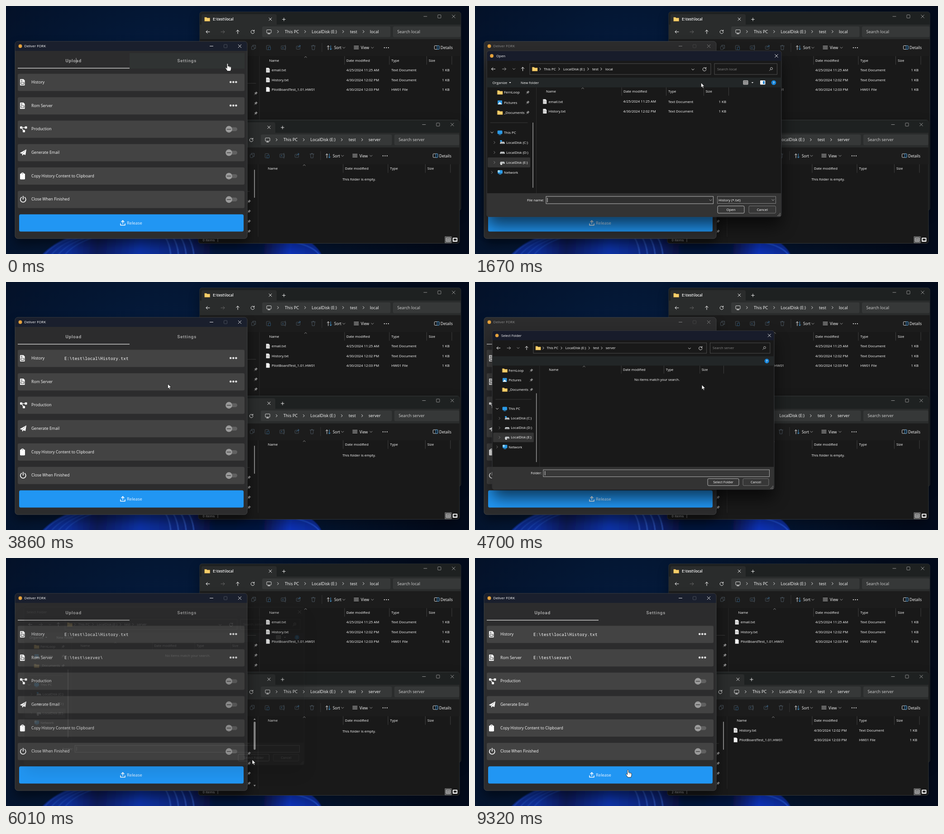
An HTML page for the animation above (9450 ms loop, 1023x547 px).

```html
<!DOCTYPE html>
<html lang="en">
<head>
<meta charset="utf-8">
<title>Release tool demo</title>
<style>
html,body{margin:0;width:100%;height:100%;overflow:hidden;background:#030b1d}
svg{display:block;width:100%;height:100%}
text{font-family:"Open Sans","Noto Sans",sans-serif;white-space:pre}
.mono{font-family:"Noto Sans Mono","DejaVu Sans Mono",monospace}
.tab{font-family:Roboto,sans-serif;font-weight:500;letter-spacing:.86px}
</style>
</head>
<body>
<svg id="stage" viewBox="0 0 1023 547" xmlns="http://www.w3.org/2000/svg"></svg>
<script>
const LOOP = 9450, S = 7.85;
const INK = '#fff', DIM = '#8d8d8d', LINE = '#4a4a4a';
const END = 'text-anchor="end"', MID = 'text-anchor="middle"';

// drawing helpers; text is placed by the middle of its capitals
const T = (x, y, s, size = S, fill = INK, more = '') =>
  `<text x="${x}" y="${y + size * .36}" font-size="${size}" fill="${fill}" ${more}>${s}</text>`;
const R = (x, y, w, h, fill, r = 0, line = 'none', lw = .8) =>
  `<rect x="${x}" y="${y}" width="${w}" height="${h}" rx="${r}" fill="${fill}" stroke="${line}" stroke-width="${lw}"/>`;
const P = (d, line = INK, w = .9, fill = 'none') =>
  `<path d="${d}" stroke="${line}" stroke-width="${w}" fill="${fill}" stroke-linejoin="round" stroke-linecap="round"/>`;
const F = (d, fill) => P(d, 'none', 0, fill);
const C = (x, y, r, fill, line = 'none') => `<circle cx="${x}" cy="${y}" r="${r}" fill="${fill}" stroke="${line}"/>`;
const G = (id, s, more = '') => `<g id="${id}" ${more}>${s}</g>`;
const each = (list, draw) => list.map(draw).join('');
const shade = (x, y, w, h, alpha, drop, blur) =>
  `<rect x="${x}" y="${y + drop}" width="${w}" height="${h}" rx="8" fill="#000" opacity="${alpha}" filter="url(#${blur})"/>`;

// small icons
const right = (x, y, c = INK) => P(`M${x - 1.3} ${y - 2.6}l2.6 2.6-2.6 2.6`, c);
const down = (x, y, c = INK) => P(`M${x - 2.6} ${y - 1.3}l2.6 2.6 2.6-2.6`, c);
const caretUp = (x, y) => P(`M${x - 2.5} ${y + 1.2}l2.5-2.4 2.5 2.4`, '#aaa', .8);
const wedge = (x, y) => F(`M${x - 2.2} ${y - 1}h4.4l-2.2 2.3z`, INK);
const cross = (x, y, c = INK, r = 3.3) => P(`M${x - r} ${y - r}l${2 * r} ${2 * r}m0 ${-2 * r}l${-2 * r} ${2 * r}`, c);
const plus = (x, y) => P(`M${x - 3.3} ${y}h6.6m-3.3-3.3v6.6`);
const arrowL = (x, y) => P(`M${x + 4} ${y}h-8l3.2-3.2m-3.2 3.2l3.2 3.2`, INK, 1);
const arrowR = (x, y, c) => P(`M${x - 4} ${y}h8l-3.2-3.2m3.2 3.2l-3.2 3.2`, c, 1);
const arrowU = (x, y) => P(`M${x} ${y + 4}v-8l-3.2 3.2m3.2-3.2l3.2 3.2`, INK, 1);
const reload = (x, y) => P(`M${x + 3.2} ${y - 2}a3.8 3.8 0 1 0 .6 2.4M${x + 3.6} ${y - 4.2}v2.6h-2.6`);
const folder = (x, y) => P(`M${x} ${y - 4}h4l1.5 1.5h6v7h-11.5z`, '#e0a63c', .5, '#f6cf6b');
const pin = (x, y) => P(`M${x - 3.4} ${y + 3.4}l2.2-2.2`, '#9a9a9a', .8) +
  P(`M${x - 2.8} ${y - .6}l3.4 3.4.8-2.2 2.2-1.4-2.8-2.8-1.4 2.2z`, '#9a9a9a', .5, '#8a8a8a');
const sheet = (x, y, lines) => P(`M${x} ${y - 5}h5.4l2.2 2.2v7.8h-7.6z`, '#bbb', .4, '#f4f4f4') +
  (lines ? P(`M${x + 1.6} ${y - 1.6}h4.6m-4.6 2h4.6m-4.6 2h4.6`, '#8c8c8c', .7) : '');
const screen = (x, y, fill = 'none', line = INK) =>
  R(x - 5, y - 4.5, 10, 7, fill, 1, line) + P(`M${x - 2.5} ${y + 4.5}h5m-2.5-2v2`, line);
const drive = (x, y) => F(`M${x - 4} ${y - 2}h8l1.2 2.4v2h-10.4v-2z`, '#cfd3d6') + P(`M${x - 3.4} ${y + 1.2}h6.8`, '#444', .8);
const winKeys = (x, y, c, box = c) => P(`M${x - 66} ${y}h7`, c) + R(x - 35, y - 3.5, 7, 7, 'none', .8, box) + cross(x, y, c);

const defs = `<defs>
<filter id="soft" x="-20%" y="-20%" width="140%" height="150%"><feGaussianBlur stdDeviation="12"/></filter>
<filter id="deep" x="-20%" y="-30%" width="140%" height="170%"><feGaussianBlur stdDeviation="18"/></filter>
<filter id="haze"><feGaussianBlur stdDeviation="1.2"/></filter>
<radialGradient id="sky" gradientUnits="userSpaceOnUse" cx="350" cy="330" r="640">
<stop offset="0" stop-color="#062250"/><stop offset=".5" stop-color="#041734"/><stop offset="1" stop-color="#030b1c"/></radialGradient>
<linearGradient id="silk" gradientUnits="userSpaceOnUse" x1="80" y1="500" x2="700" y2="560">
<stop offset="0" stop-color="#0a2a88"/><stop offset=".1" stop-color="#0c2f9c"/><stop offset=".2" stop-color="#071a58"/>
<stop offset=".35" stop-color="#0d33a8"/><stop offset=".5" stop-color="#0a2578"/><stop offset=".62" stop-color="#06133c"/>
<stop offset=".78" stop-color="#061442"/><stop offset=".88" stop-color="#0c34bc"/><stop offset="1" stop-color="#0a2a90"/></linearGradient></defs>`;

function wallpaper() {
  let s = F('M78 550Q104 522 150 505H640Q686 522 698 550Z', 'url(#silk)');
  for (let i = 0; i < 4; i++) {
    s += P(`M${86 + i * 15} 548q18-22 58-36`, '#2350c0', 1.2);
    s += P(`M${352 + i * 17} 510q10 16 12 38`, '#3a68d8', 1.3);
  }
  return R(0, 0, 1023, 547, 'url(#sky)') + `<g filter="url(#haze)">${s}${P('M640 522q38 8 52 26', '#2a5fe8', 1.5)}</g>`;
}

const row = (y, name, date, type, lined) => sheet(575, y, lined) + T(587, y, name) + T(752, y, date, 7.75) +
  T(851.5, y, type) + T(980, y, '1 KB', S, INK, END);
const history = y => row(y, 'History.txt', '4/30/2024 12:02 PM', 'Text Document', 1);
const build = y => row(y, 'PilotBoardTest_1.01.HW01', '4/30/2024 12:03 PM', 'HW01 File', 0);

// file manager window; the server one is the same layout shifted
function manager(server) {
  const h = server ? 272 : 438, last = server ? 'server' : 'local', gap = server ? 6 : 0;
  const off = '#4d5862', blue = '#4aa3e0', bar = '#2a2c2c', field = '#363838';
  let s = shade(428, 13, 577, h, .35, 8, 'soft') + R(428, 13, 577, h, '#191919', 5, '#3c3f40');
  s += F('M428.4 41V18q0-4.6 4.6-4.6h567q4.6 0 4.6 4.6v23z', '#1e2121');
  s += F('M432 41.5V22q0-4 4-4h158q4 0 4 4v19.5z', bar);
  s += R(428.4, 41, 576.2, 32.5, bar) + R(428.4, 73.5, 576.2, 37, '#1c1c1c');
  s += folder(439, 29) + T(457, 29, 'E:\\test\\' + last, 8, INK, 'font-weight="600"') + cross(584, 29, INK, 3) + plus(614, 29.5);
  s += winKeys(989, 23, '#a5a5a5');
  s += arrowL(446, 57) + arrowR(479, 57, '#666') + arrowU(512, 57) + reload(545, 57);
  s += R(566, 45, 283.5 + gap, 23.5, field, 3) + R(855 + gap, 45, 149.6 - gap, 23.5, field, 3);
  s += screen(581, 57) + each([601, 661, 745, 790], x => right(x, 56.5));
  s += T(616, 56.5, 'This PC', 9.25) + T(675.5, 56.5, 'LocalDisk (E:)', 9.15) + T(760, 56.5, 'test', 9.15) + T(804, 56.5, last, 9.15);
  s += T(864.5 + gap, 56.5, 'Search ' + last, 9.1, '#d4d4d4');
  // command bar
  s += R(542.5, 89, 6, 7, 'none', 1, off) + P('M545 89v-2.5h6.5v7h-3', off);
  s += R(575.5, 87, 8, 9.5, 'none', 1, off) + R(579.5, 90.5, 5, 6, '#1c1c1c', .5, '#2f5f85');
  s += R(608, 88, 10, 7.5, 'none', 1, off) + T(610, 91.8, 'A', 6, '#3d6f98') + P('M617 86v11.5', off);
  s += R(641.5, 88.5, 8, 7, 'none', 1, off) + P('M645 92q1-4 5.5-4m-2-2l2 2-2 2', '#3d6f98');
  s += P('M674.5 88h9m-7.8 0l.8 8.5h5l.8-8.5m-4.5 0v-1.5h2.4v1.5', off);
  s += P('M698 82v19', '#383838') + P('M712 96.5v-9l-2.4 2.5m2.4-2.5l2.4 2.5') + P('M717.5 87.5v9l-2.3-2.5m2.3 2.5l2.3-2.5', blue);
  s += T(725, 92, 'Sort', 8.4) + down(746.5, 92, '#aaa');
  s += P('M769 88.5h10m-10 3h10m-10 3h10') + T(784, 92, 'View', 8.5) + down(809.5, 92, '#aaa');
  s += each([836, 840.5, 845], x => C(x, 92, 1.1, INK));
  s += R(946.5, 87.5, 10.5, 8, 'none', 1.2, INK) + R(952.5, 87.5, 4.5, 8, '#123', 1, blue) + T(960, 92, 'Details', 8.5);
  // columns and side pane
  s += each([748, 847, 929.5, 985], x => P(`M${x} 111v18`, LINE, .8)) + caretUp(662, 112.5);
  s += T(581.5, 120, 'Name') + T(752, 120, 'Date modified') + T(851.5, 120, 'Type') + T(934, 120, 'Size');
  s += P(`M560 111V${server ? 270 : 450}`, '#2e2e2e') + P(`M440 170.5H${server ? 541 : 552}`, '#3a3a3a');
  for (let i = 0; i < (server ? 4 : 3); i++) s += pin(server ? 540 : 552, 192.5 + i * 22);
  if (!server) return s + row(141.5, 'email.txt', '4/25/2024 11:25 AM', 'Text Document', 1) + history(163) + build(184);
  s += G('thin', R(551.2, 122.5, 1.7, 62, '#9a9a9a', .8));
  s += G('wide', R(550.2, 122.5, 4.3, 62, '#9a9a9a', 2) + F('M549.8 118.5l2.5-3.5 2.5 3.5zM549.8 262l2.5 3.5 2.5-3.5z', '#9a9a9a'));
  s += G('empty', T(746.5, 143.5, 'This folder is empty.'));
  s += G('first', history(141.5)) + G('second', build(162.8));
  s += G('count', T(437.5, 277.4, '0 items', S, '#c8c8c8')) + P('M471 273.5v8', '#999');
  s += R(973, 270.3, 14, 13.5, '#4c4c4c', 0, '#9a9a9a') + R(975.5, 273, 9, 8, 'none', .5, INK) + P('M977 275.5h6m-6 1.8h6m-6 1.8h6', INK, .7);
  return s + R(990.5, 273, 9.5, 8, INK, .5, INK) + R(992, 274.5, 6.5, 4.5, '#222');
}

const rows = ['History', 'Rom Server', 'Production', 'Generate Email', 'Copy History Content to Clipboard', 'Close When Finished'];

function mark(i, y) {
  const K = '#424242';
  if (i < 2) return F(`M31 ${y - 6}q0-1 1-1h6.5l3 3v10q0 1-1 1h-8.5q-1 0-1-1z`, INK) +
    P(`M33 ${y - 4.6}h3m-3 2h3`, K) + R(33, y, 6.8, 4.3, 'none', .5, K, 1.1);
  if (i == 2) return R(31, y - 6, 5, 5, INK, 1) + R(41.5, y - 6, 5, 5, INK, 1) + R(37, y + 2, 5, 5, INK, 1) +
    P(`M35 ${y - 3.5}h7m-7.5 0l4 7`, INK, 1.4);
  if (i == 3) return F(`M30.5 ${y + 1}L45 ${y - 7}L43 ${y + 5.5}L38.7 ${y + 3.8}L36 ${y + 7}L35.6 ${y + 2.7}z`, INK) +
    P(`M36 ${y + 2.6}l6.5-6.6`, K, .7);
  if (i == 4) return R(31, y - 5.5, 11, 13, INK, 1.6) + R(33.8, y - 7.5, 5.4, 4, INK, 1.5) + C(36.5, y - 5, .8, K);
  return P(`M34.3 ${y - 4.7}a6 6 0 1 0 7 0M37.8 ${y - 7}v6.5`, INK, 1.7);
}

function app() {
  const heading = (c, box) => T(40.5, 88.5, 'Deliver FORK', S, c) + winKeys(516.5, 88.5, c, box);
  let s = shade(20, 78, 513, 435, .5, 13, 'soft') + R(20, 78, 513, 435, '#2c2c2d', 6, '#48494b');
  s += G('live', F('M20.5 99V84q0-5.5 5.5-5.5h501q5.5 0 5.5 5.5v15z', '#1a1f2d') + heading(INK, '#555b66'));
  s += G('idle', heading(DIM, LINE)) + C(31.5, 88.5, 3.9, '#e6a23c');
  s += G('hover', R(273, 104, 254, 34, '#303333'));
  s += T(131.5, 120.5, 'Upload', 9.65, '#c2c2c2', 'class="tab"') + T(378.5, 120.5, 'Settings', 9.65, '#b2b2b2', 'class="tab"');
  s += R(26, 136.5, 247, 1.3, '#dcdcdc') + G('beam', P('M155 115v11.5', '#bdbdbd'));
  rows.forEach((name, i) => {
    const y = 168.3 + i * 51.65;
    s += R(26, y - 18.8, 501, 38, '#434343', 3) + mark(i, y) + T(56, y - .3, name, 8.72);
    if (i < 2) s += each([496.2, 502.3, 508.4], x => C(x, y - .5, 2.3, '#e2e2e2'));
    else s += R(488, y - 4, 23, 8.5, '#616161', 4.2) + C(492.5, y + .3, 7.3, '#9b9b9b') + P(`M488.5 ${y + .3}h8`, '#333', 1.3);
  });
  s += G('path1', T(129, 168.5, 'E:\\test\\local\\History.txt', 9.45, INK, 'class="mono"'));
  s += G('path2', T(129, 220, 'E:\\test\\server\\', 9.45, INK, 'class="mono"'));
  s += `<rect id="go" x="29" y="459.5" width="496" height="38" rx="3.5"/>`;
  s += P('M258 480v-6.5m-3 2.8l3-3.2 3 3.2M253 480v3.5h10v-3.5', INK, 1.5);
  return s + T(267, 478.8, 'Release', 9.45, '#eef6ff');
}

// file dialog, for a file or for a folder
function dialog(id, dir) {
  const title = dir ? 'Select Folder' : 'Open', last = dir ? 'server' : 'local', edge = '#5c5c5c';
  const top = fill => F('M26.5 121v-16q0-5.5 5.5-5.5h639q5.5 0 5.5 5.5v16z', fill);
  let s = shade(26, 99, 651, 366, .62, 20, 'deep') + R(26, 99, 651, 366, '#191919', 5, '#46484c');
  s += G(id + 'On', top('#181c2b') + C(37, 110, 3.9, '#e6a23c') + T(47, 110, title));
  s += G(id + 'Off', top('#202020') + T(32, 110, title, S, '#b5b5b5')) + cross(666, 110);
  s += arrowL(40.5, 139) + arrowR(64.5, 139, '#aaa') + down(86, 139, '#aaa') + arrowU(105.5, 139);
  s += R(121, 127, 400, 24, '#191919', 0, edge) + R(529, 127, 138.5, 24, '#191919', 0, edge);
  s += folder(126.5, 139) + each([144, 186, 250, 279], x => right(x, 139));
  s += T(152, 139, 'This PC') + T(195, 139, 'LocalDisk (E:)') + T(259, 139, 'test') + T(288, 139, last) + down(481.5, 140) + reload(507, 139.5);
  s += T(535, 139, 'Search ' + last, S, '#858585') + C(655, 138, 2.5, 'none', '#bbb') + P('M653 140l-2.6 2.8', '#bbb');
  s += R(26.4, 158, 650.2, 21.5, '#222627');
  const v = dir ? 617 : 598;
  s += G(id + 'Bar', T(38.5, 168.8, 'Organize') + wedge(77.5, 169) + T(101, 168.8, 'New folder') +
    R(v - 5, 164.5, 10, 8.5, '#555', .5, INK) + P(`M${v - 4} 167h8m-8 2h8m-8 2h8`, INK, .7) + wedge(v + 15, 169) +
    (dir ? '' : R(630.5, 164.5, 10.5, 8.5, INK, .5, INK) + R(636, 165.5, 4, 6.5, '#2b8ad6')));
  s += C(660, 169, 5.3, '#1583d8') + T(660, 169, '?', 7.5, INK, MID + ' font-weight="700"');
  // columns
  s += each([324, 422.5, 505.5, 560.5], x => P(`M${x} 180v17.5`, LINE, .8)) + caretUp(238, 181.5) + P('M135.5 180v233', '#2e2e2e');
  s += T(157, 188.5, 'Name') + T(328, 188.5, 'Date modified') + T(427, 188.5, 'Type') + T(509.5, 188.5, 'Size');
  if (dir) s += T(354, 211.5, 'No items match your search.');
  else {
    s += `<rect id="pick" x="146.5" y="222.5" width="411.5" height="18.5"/>`;
    s += each([['email.txt', '4/25/2024 11:25 AM'], ['History.txt', '4/30/2024 12:02 PM']], ([name, date], i) => {
      const y = 210.7 + i * 21.3;
      return sheet(150.5, y, 1) + T(162.5, y, name) + T(327.5, y, date, 7.75) + T(427, y, 'Text Document') + T(555, y, '1 KB', S, INK, END);
    });
  }
  // side pane
  s += each(['FernLoop', 'Pictures', '_Documents'], (name, i) => {
    const y = 190.5 + i * 22.2;
    const icon = i == 1 ? R(50, y - 4.5, 10, 9, '#2f97e0', 1) + F(`M50.5 ${y + 4}l4-5 5 5z`, INK) : folder(49.5, y);
    return icon + T(64, y, name) + pin(116.5, y);
  });
  s += P('M34 257.3h82', '#3c3c3c') + (dir ? R(127.3, 243, 1.5, 159, '#9a9a9a', .7) : R(127.3, 257, 1.5, 144, '#9a9a9a', .7));
  s += R(28, 334, 94, 22, '#343434', 2) + down(37.5, 279) + screen(55, 279.5, '#2b9be8', '#2b9be8') + T(64, 279, 'This PC');
  s += each(['C', 'D', 'E'], (letter, i) => {
    const y = 301 + i * 22;
    return right(43, y, '#888') + drive(60.5, y + .5) + T(69, y, `LocalDisk (${letter}:)`);
  });
  s += R(55.5, 296, 4, 3.5, '#2b9be8') + R(56, 346.5, 4, 4, '#ddd', 1);
  s += right(37.5, 367, '#888') + screen(55.5, 367, '#2b9be8', '#2b9be8') + C(52.5, 364.5, 2.6, '#9fd4e8') + T(64, 367, 'Network');
  // foot
  const key = (x, w, y, label, line) => R(x, y, w, 16, '#373737', 2.5, line) + T(x + w / 2, y + 8, label, S, INK, MID);
  s += F('M26.4 413h650.2v46q0 5.6-5.6 5.6h-639q-5.6 0-5.6-5.6z', '#333');
  if (dir) s += T(115, 427.5, 'Folder:') + R(144, 419.5, 522, 16, '#383838', 0, '#cfcfcf') + P('M148 423v9') + key(523.5, 72, 440, title, '#e0e0e0');
  else s += T(115, 427.8, 'File name:') + R(157, 420, 369.5, 16, '#2f2f2f', 0, '#e0e0e0') + down(520.5, 428.3, '#bbb') +
    G('caret', P('M160 423.5v9')) + G('typed', T(159.5, 428, 'History.txt')) +
    R(535.5, 420, 129, 15.5, '#333', 0, '#999') + T(538, 427.8, 'History (*.txt)') + down(658.5, 428, '#bbb') + key(536, 59, 441, title, '#e0e0e0');
  s += key(605, 59.5, dir ? 440 : 441, 'Cancel', '#8a8a8a');
  s += P('M674 457.5v0m0 2.5v0m-2.5 0v0m2.5 2.5v0m-2.5 0v0m-2.5 0v0', '#aaa', 1.5);
  return G(id, s);
}

const arrow = P('M0 0v10.2l2.4-2.2 1.6 3.8 1.7-.7-1.6-3.7h3.2z', '#111', .7, INK);
const hand = P('M-1.4 1.3C-1.4-.4 1.2-.4 1.2 1.3V6C1.8 5.2 3.4 5.4 3.6 6.6C4.2 5.9 5.7 6.2 5.9 7.3C6.8 6.8 8 7.3 8 8.5V11.5C8 13.5 6.8 14.2 6.6 16.5H-.6C-1 14.5-3.5 12.4-4.4 10.2C-4.8 9-3.3 8.3-2.6 9.2L-1.4 10.5Z', '#111', .8, INK) +
  P('M3.4 7v2.6M5.8 7.5v2.2', '#333', .5);

const $ = id => document.getElementById(id);
$('stage').innerHTML = defs + wallpaper() + G('local', manager(false)) + G('server', manager(true), 'transform="translate(-3 238.5)"') +
  G('app', app()) + dialog('file', false) + dialog('dir', true) +
  G('press', C(0, 0, 8.7, '#d6c924'), 'opacity=".85"') + G('arrow', arrow) + G('hand', hand);

// time, opacity, scale
const fileSteps = [[0, 0, 1], [1470, .5, .93], [1540, .97, .957], [1600, 1, .985], [1670, 1, 1], [2860, .84, .99], [2920, .5, .972], [2990, .15, .951], [3050, 0, 1]];
const dirSteps = [[0, 0, 1], [4630, .5, .93], [4700, 1, .957], [4760, 1, .985], [4830, 1, 1], [5880, .84, .99], [5940, .5, .972], [6010, .14, .951], [6080, 0, 1]];
// time, x, y
const track = [[0, 489.5, 127], [520, 489.5, 127], [1140, 499.5, 169.5], [1720, 499.5, 169.5], [2220, 232.5, 232], [3580, 232.5, 232],
  [4150, 488, 218], [4480, 501.2, 227], [4840, 501.2, 227], [5460, 544, 445], [6410, 544, 445], [7020, 338, 468.5], [9319, 338, 468.5], [9320, 338, 467.3]];
const presses = [[1340, 1470], [2290, 2360], [2580, 2650], [2790, 2920], [4560, 4630], [5530, 5600], [7160, 7300]];

const within = (t, a, b) => t >= a && t < b;
const show = (id, on) => { $(id).style.display = on ? '' : 'none'; };

function place(t) {
  const i = track.findIndex(p => p[0] > t);
  if (i < 0) return track[track.length - 1].slice(1);
  const [t0, x0, y0] = track[i - 1], [t1, x1, y1] = track[i];
  const p = (t - t0) / (t1 - t0), e = p * p * (3 - 2 * p);
  return [x0 + (x1 - x0) * e, y0 + (y1 - y0) * e];
}

function pose(id, steps, t, cx, cy, closing) {
  const [, alpha, k] = steps.filter(s => s[0] <= t).pop();
  show(id, alpha > 0);
  $(id).setAttribute('opacity', alpha);
  $(id).setAttribute('transform', `translate(${cx} ${cy}) scale(${k}) translate(-351.5 -282)`);
  show(id + 'On', t < closing);
  show(id + 'Off', t >= closing);
}

function draw(t) {
  pose('file', fileSteps, t, 351.5, 282, 2860);
  pose('dir', dirSteps, t, 349.5, 282.5, 5880);
  show('dirBar', t >= 4760);
  const modal = within(t, 1470, 2860) || within(t, 4630, 5880);
  show('live', !modal);
  show('idle', modal);
  show('hover', t < 1340);
  show('beam', t < 520);
  show('path1', t >= 2860);
  show('path2', t >= 5880);
  show('typed', t >= 2580);
  show('caret', t < 2580);
  $('pick').setAttribute('fill', t >= 2290 ? '#777' : t >= 2150 ? '#4d4d4d' : 'none');
  $('go').setAttribute('fill', within(t, 7160, 7300) ? '#43a6f5' : '#2196f3');
  const wide = within(t, 6010, 6480);
  show('wide', wide);
  show('thin', !wide);
  show('empty', t < 8310);
  show('first', t >= 8310);
  show('second', t >= 8440);
  $('count').firstChild.textContent = (t < 8310 ? 0 : t < 8440 ? 1 : 2) + ' items';

  const [x, y] = place(t), pressed = presses.some(p => within(t, ...p));
  const pointing = t < 1470 || within(t, 4130, 4630) || t >= 6840;
  ['press', 'arrow', 'hand'].forEach(id => $(id).setAttribute('transform', `translate(${x} ${y})`));
  show('press', pressed);
  show('arrow', !pressed && !pointing);
  show('hand', !pressed && pointing);
}

const start = performance.now();
function tick() {
  draw((performance.now() - start) % LOOP);
  requestAnimationFrame(tick);
}
tick();
</script>
</body>
</html>
```
